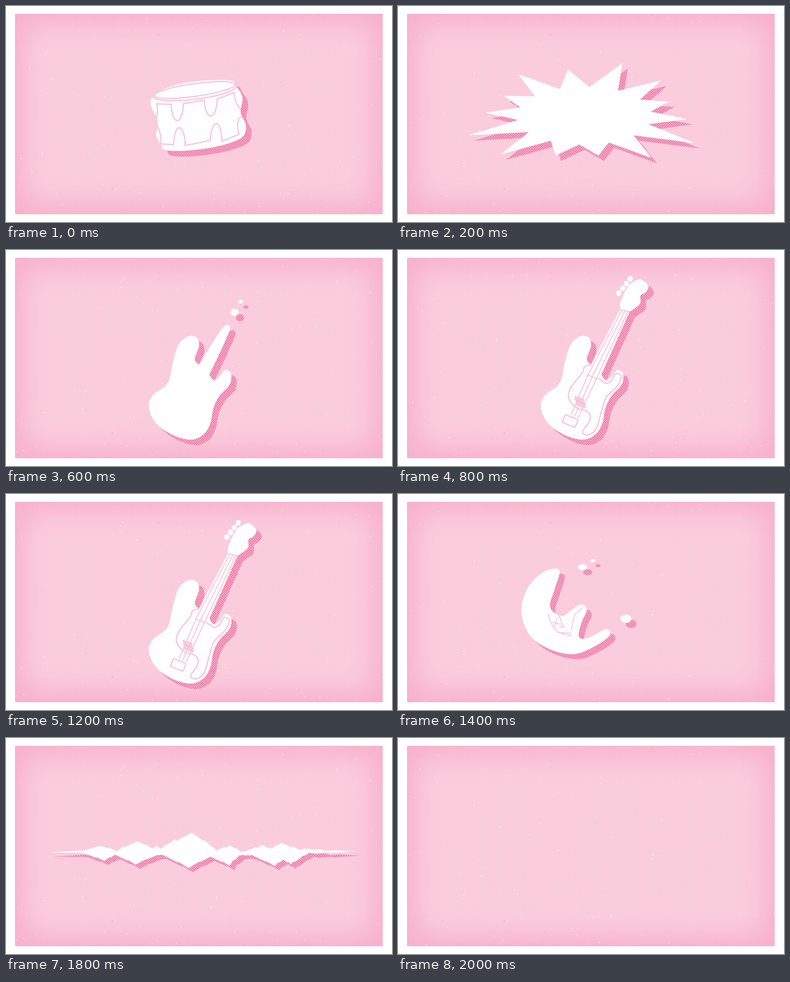
An HTML page for the animation above (2200 ms loop, 640 px wide and 360 px high).

```html
<!DOCTYPE html>
<html lang="en">
<head>
<meta charset="utf-8">
<title>Sound shapes</title>
<style>
html, body { margin: 0; width: 100%; height: 100%; overflow: hidden; background: #fff; }
svg { display: block; width: 100vw; height: 100vh; }
.line { fill: none; stroke: #f9c2d7; stroke-width: 2; stroke-linecap: round; stroke-linejoin: round; }
.body { fill: #fff; }
.shade { fill: url(#dots); }
</style>
</head>
<body>
<svg id="stage" viewBox="0 0 640 360">
  <defs>
    <pattern id="dots" width="4" height="4" patternUnits="userSpaceOnUse">
      <rect width="4" height="4" fill="#f8b4ce"/>
      <circle cx="1" cy="1" r="1.3" fill="#ee7ba8"/>
      <circle cx="3" cy="3" r="1.3" fill="#ee7ba8"/>
    </pattern>
    <pattern id="weave" width="3" height="3" patternUnits="userSpaceOnUse">
      <path d="M0 .5H3M.5 0V3" stroke="#f5a5c4" stroke-width=".5" opacity=".2"/>
    </pattern>
    <filter id="soft" x="-20%" y="-20%" width="140%" height="140%">
      <feGaussianBlur stdDeviation="20"/>
    </filter>
    <clipPath id="panel"><rect x="15" y="13" width="609.6" height="334"/></clipPath>
  </defs>
  <g clip-path="url(#panel)">
    <rect width="640" height="360" fill="#f8b1cc"/>
    <rect x="31" y="30" width="577" height="299" rx="26" fill="#facfde" filter="url(#soft)"/>
    <rect width="640" height="360" fill="url(#weave)"/>
    <g id="grain"></g>
  </g>
  <g id="scenes"></g>
</svg>
<script>
const STEP = 200, LOOP = 2200;
const $ = id => document.getElementById(id);

function random(seed) {
  return () => {
    seed = (seed * 1664525 + 1013904223) % 4294967296;
    return seed / 4294967296;
  };
}

// "x,y x,y ..." to a list of points
const points = text => text.split(' ').map(p => p.split(',').map(Number));

// Smooth curve through key points
function curve(text, closed) {
  const p = points(text), n = p.length;
  const at = i => closed ? p[(i + n) % n] : p[Math.max(0, Math.min(n - 1, i))];
  const bend = (a, b, c, s) => [0, 1].map(k => (b[k] + s * (c[k] - a[k]) / 6).toFixed(1));
  let d = 'M' + p[0];
  for (let i = 0; i < (closed ? n : n - 1); i++) {
    d += `C${bend(at(i - 1), at(i), at(i + 1), 1)} ${bend(at(i), at(i + 1), at(i + 2), -1)} ${at(i + 1)}`;
  }
  return d + (closed ? 'Z' : '');
}

const oval = (x, y, rx, ry = rx) =>
  `M${x - rx} ${y}a${rx} ${ry} 0 1 0 ${2 * rx} 0a${rx} ${ry} 0 1 0 ${-2 * rx} 0Z`;

function star(x, y, rx, ry, tips, inner, wobble) {
  const p = [];
  for (let i = 0; i < tips * 2; i++) {
    const a = -1.72 + i * Math.PI / tips;
    const r = i % 2 ? inner : 1 - wobble * (1 + Math.sin(i * 2.4)) / 2;
    p.push([x + rx * r * Math.cos(a), y + ry * r * Math.sin(a)]);
  }
  return 'M' + p.join(' ') + 'Z';
}

const stroke = (d, width = 2) => `<path d="${d}" stroke-width="${width}"/>`;

function shape(d, shift, detail = '') {
  return `<path class="shade" d="${d}" transform="translate(${shift} ${shift})"/>` +
    `<path class="body" d="${d}"/><g class="line">${detail}</g>`;
}

// Drum: lugs hang from the top band and stand on the bottom one
const lug = (x, y, w, h) =>
  `L${x} ${y}c0 ${h / 2} ${w * 0.2} ${h} ${w / 2} ${h}s${w / 2} ${-h / 2} ${w / 2} ${-h * 1.05}`;

const drum = shape(
  curve('243,152 270,135 320,125 372,124 382,134 392,152 389,174 391,184 398,200 390,220 ' +
    '350,234 300,241 265,240 257,231 249,215 252,201 250,187 241,168', true), 9.5,
  '<ellipse cx="313" cy="140" rx="68" ry="10.5" transform="rotate(-8 313 140)"/>' +
  stroke('M244 152C258 166 373 153 382 134') +
  stroke('M249 187Q253 178 250 163' + lug(274, 164, 20, 27) + lug(329, 157, 21, 26) + 'L378 144Q380 164 389 171') +
  stroke('M252 202Q257 210 257 230' + lug(278, 231, 19, -28) + lug(339, 224, 19, -28) + 'L386 214Q381 190 389 185'));

const torso = curve('320,191 313,182 320,160 316,146 302,144 286,158 276,190 268,222 243,243 237,264 ' +
  '250,290 278,309 307,316 328,307 339,288 344,263 354,243 371,224 373,206 363,200 354,211 345,217 337,208');
const head = curve('384,103 401,90 402,76 410,71 415,60 403,49 390,53 380,63 369,86 368,99').replace('M', 'L') + 'Z';
const guard = curve('320,191 309,195 306,204 286,230 283,247 296,263 315,270 318,284 306,303 316,308 ' +
  '329,297 337,270 345,246 364,226 370,210 361,206 354,218 344,222 333,214');

let tuners = '', strings = 'M368 99L384 103M314 208L331 215', pickup = '';
for (let i = 0; i < 4; i++) {
  tuners += oval(385 - i * 6.3, 48 + i * 8, 4.5);
  if (i < 3) strings += `M${371 + i * 5} ${101 + i}L${315 + i * 7} ${208 + i * 3}L${287 + i * 6} ${275 + i * 2}`;
  pickup += `M${294 + (i >> 1) * 2} ${245 + i * 4}l14 5`;
}

const guitar = shape(torso + head + tuners, 9,
  stroke(guard) + stroke(strings, 1.6) + stroke(pickup, 3) +
  '<rect class="body" x="274" y="278" width="23" height="14" rx="2" transform="rotate(22 285.5 285)"/>');

// Half-grown instrument
const sprout = shape(torso + 'C346 190 362 156 371 134C374 124 365 121 358 131Q340 158 320 191Z' +
  oval(379, 104, 7, 6) + oval(389, 86, 4, 3), 9);

const splash = shape(
  curve('268,129 255,125 234,135 212,162 205,200 219,236 250,258 290,267 322,256 350,237 346,225 ' +
    '315,240 300,238 304,215 313,193 304,184 288,193 274,203 258,197 252,184 260,158', true) +
  oval(306, 122, 7.5, 5) + oval(323, 111, 4, 2.5) + oval(378, 208, 9, 7), 8.5,
  stroke(curve('249,200 255,218 266,230 288,237') + curve('264,196 270,210 274,222') +
    curve('288,226 293,202 306,190') + 'M256 214l14 3M264 207l-5 15M268 222l9 -1M265 231l22 1', 1.4));

// Add a small ledge to each long slope; side is -1 above the axis, 1 below
function jag(text, side) {
  const p = points(text), out = [];
  p.forEach(([x, y], i) => {
    out.push([x, y]);
    const next = p[i + 1];
    if (!next || Math.abs(next[1] - y) < 34) return;
    const dx = next[0] - x, dy = next[1] - y;
    const falling = dy * side < 0 ? 1 : -1;
    const ledge = [[0.42, 0], [0.46, 3]].map(([k, s]) => [x + dx * k + s * falling, y + dy * k]);
    out.push(...ledge.sort((a, b) => (a[0] - b[0]) * Math.sign(dx)));
  });
  return out;
}

const ridge = jag('72,193 98,187 124,178 129,182 156,142 183,182 218,108 243,165 249,143 257,166 280,96 ' +
  '284,106 308,42 350,180 360,152 364,157 371,140 390,190 395,183 397,189 413,153 416,162 425,137 434,160 ' +
  '443,160 457,118 470,155 474,148 488,174 494,164 512,172 520,168 533,182 545,176 579,186', -1);
const roots = jag('537,199 530,194 514,201 503,196 486,245 472,285 460,248 446,297 408,214 400,208 387,216 ' +
  '371,294 339,225 303,312 260,212 250,214 215,285 181,211 163,258 130,200 122,194 95,195', 1);

const wave = height =>
  shape('M' + [...ridge, ...roots].map(([x, y]) => [x, 190 + (y - 190) * height]).join(' ') + 'Z', 7);

const scenes = {
  drum,
  burst: shape(star(309, 183, 214, 92, 14, 0.52, 0.3), 9),
  spark: shape(star(314, 212, 31, 31, 11, 0.53, 0.12), 9),
  sprout,
  guitar,
  splash,
  wave: wave(1),
  hush: wave(0.22),
  blank: ''
};
const order = ['drum', 'burst', 'spark', 'sprout', 'guitar', 'guitar', 'guitar', 'splash', 'wave', 'hush', 'blank'];
const grains = [0, 1, 1, 2, 0, 1, 2, 1, 0, 2, 1];

// Paper specks, denser towards the bottom
function speckle(seed) {
  const rnd = random(seed * 977 + 41);
  let light = '', dark = oval(253, 48, 0.8) + oval(176, 305, 0.8);
  for (let i = 0; i < 420; i++) {
    const x = (15 + rnd() * 609).toFixed(1);
    const y = (13 + 334 * (i % 3 ? rnd() : 1 - rnd() ** 2 * 0.35)).toFixed(1);
    const w = (0.4 + rnd() ** 3 * 1.1).toFixed(1);
    if (i % 12) light += `M${x} ${y}h${w}v${w}h-${w}Z`;
    else dark += `M${x} ${y}h.7v.7h-.7Z`;
  }
  return `<path d="${light}" fill="#fff" opacity=".65"/><path d="${dark}" fill="#d9739c" opacity=".6"/>`;
}

$('grain').innerHTML = [0, 1, 2].map(i => `<g>${speckle(i)}</g>`).join('');
$('scenes').innerHTML = Object.keys(scenes).map(k => `<g data-name="${k}">${scenes[k]}</g>`).join('');

const show = (node, on) => { node.style.display = on ? '' : 'none'; };

function draw(t) {
  const step = Math.floor((t % LOOP) / STEP);
  for (const g of $('scenes').children) show(g, g.dataset.name === order[step]);
  [...$('grain').children].forEach((g, i) => show(g, i === grains[step]));
}

const start = performance.now();
function tick(now) {
  draw(Math.max(0, now - start));
  requestAnimationFrame(tick);
}
draw(0);
requestAnimationFrame(tick);
</script>
</body>
</html>
```
